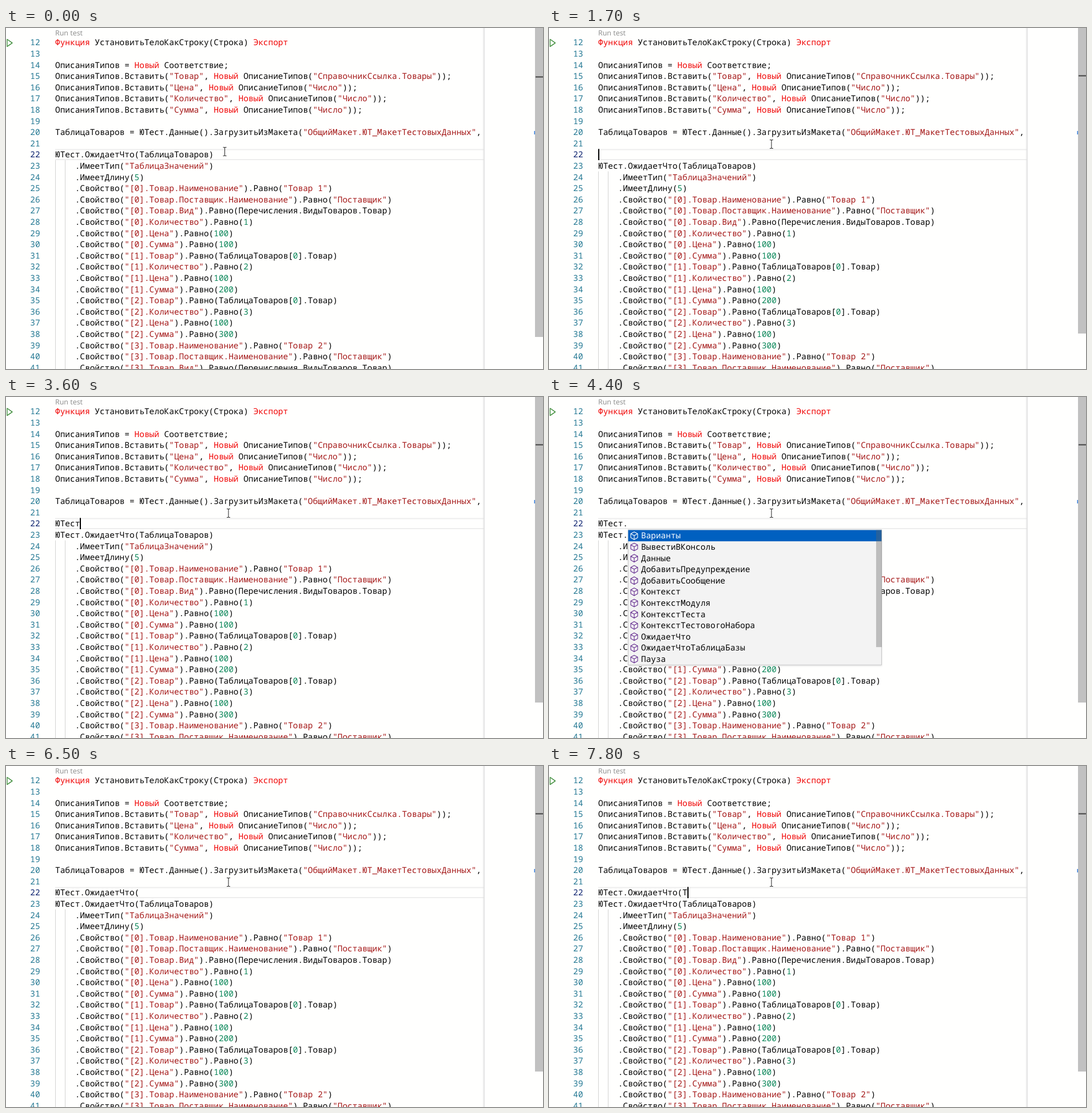
Write an HTML page that moves like this. It is 939x596 px and loops after 8000 ms.

```html
<!DOCTYPE html>
<html lang="ru">
<head>
<meta charset="utf-8">
<title>Автодополнение в редакторе</title>
<style>
  html, body { margin: 0; width: 100%; height: 100%; overflow: hidden; background: #fffffe; }
  svg { display: block; }
  text { font: 14.44px "Noto Sans Mono", monospace; white-space: pre; text-rendering: geometricPrecision; }
  .lens { font: 12.38px "Noto Sans", sans-serif; fill: #919191; }
  .num { fill: #237893; text-anchor: end; }
  .num.active { fill: #0b216f; }
  .key { fill: #f00000; }
  .str { fill: #a31515; }
  .lit { fill: #098658; }
  .match { font-weight: 700; fill: #0066bf; }
  .selected .match { fill: #9dddff; }
  .selected text { fill: #fff; }
  .cube { fill: none; stroke: #652d90; stroke-width: 1.1; stroke-linejoin: round; }
  .selected .cube { stroke: #fff; }
</style>
</head>
<body>
<svg id="stage" width="939" height="596" viewBox="0 0 939 596">
  <defs>
    <linearGradient id="edge">
      <stop offset="0" stop-color="#ddd" stop-opacity="0"/>
      <stop offset="1" stop-color="#ddd"/>
    </linearGradient>
    <filter id="shadow" x="-5%" y="-20%" width="110%" height="150%">
      <feDropShadow dx="0" dy="1" stdDeviation="1.5" flood-color="#000" flood-opacity=".14"/>
    </filter>
    <path id="cube" d="M0-6.6 6-3.4V3.4L0 6.8-6 3.4V-3.4ZM-6-3.4 0-.2 6-3.4M0-.2V6.8"/>
  </defs>
  <text class="lens" x="86" y="13">Run test</text>
  <path d="M2 19.8V32.4L11 26.1Z" fill="none" stroke="#388a34" stroke-width="1.3" stroke-linejoin="round"/>
  <g id="editor"></g>
  <rect x="833" width="4" height="596" fill="url(#edge)"/>
  <rect x="923.5" y="180" width="2" height="6" fill="#3a82e0"/>
  <rect id="slider" x="925" width="14" fill="#c1c1c1"/>
  <rect id="mark" x="926" width="13" height="2" fill="#424242"/>
  <g id="popup"></g>
  <rect id="caret" width="2" height="19.6" fill="#000"/>
  <path id="mouse" d="M-3-7.5H-1L0-6.5 1-7.5H3M0-6.5V6.5M-3 7.5H-1L0 6.5 1 7.5H3" fill="none" stroke="#333" stroke-width="1.1"/>
</svg>
<script>
const LOOP = 8000, LEFT = 86, CHAR = 8.664, ROW = 19.6, FIRST = 12, POPUP_WIDTH = 444;
const el = id => document.getElementById(id);
const lineTop = n => 15.4 + (n - FIRST) * ROW;
const colX = col => LEFT + col * CHAR;

const head = `Функция УстановитьТелоКакСтроку(Строка) Экспорт

ОписанияТипов = Новый Соответствие;
ОписанияТипов.Вставить("Товар", Новый ОписаниеТипов("СправочникСсылка.Товары"));
ОписанияТипов.Вставить("Цена", Новый ОписаниеТипов("Число"));
ОписанияТипов.Вставить("Количество", Новый ОписаниеТипов("Число"));
ОписанияТипов.Вставить("Сумма", Новый ОписаниеТипов("Число"));

ТаблицаТоваров = ЮТест.Данные().ЗагрузитьИзМакета("ОбщийМакет.ЮТ_МакетТестовыхДанных",
`.split("\n");

const prop = (path, value) => `    .Свойство("${path}").Равно(${value})`;
const amounts = (i, count, sum) => [
  prop(`[${i}].Количество`, count), prop(`[${i}].Цена`, 100), prop(`[${i}].Сумма`, sum)];
const product = (i, name) => [
  prop(`[${i}].Товар.Наименование`, `"${name}"`),
  prop(`[${i}].Товар.Поставщик.Наименование`, '"Поставщик"'),
  prop(`[${i}].Товар.Вид`, "Перечисления.ВидыТоваров.Товар")];
const sameProduct = i => prop(`[${i}].Товар`, "ТаблицаТоваров[0].Товар");

const body = [
  "ЮТест.ОжидаетЧто(ТаблицаТоваров)",
  '    .ИмеетТип("ТаблицаЗначений")',
  "    .ИмеетДлину(5)",
  ...product(0, "Товар 1"), ...amounts(0, 1, 100),
  sameProduct(1), ...amounts(1, 2, 200),
  sameProduct(2), ...amounts(2, 3, 300),
  ...product(3, "Товар 2")];

const lists = {
  modules: ["ЮТДанные", "ЮТест"],
  members: ["Варианты", "ВывестиВКонсоль", "Данные", "ДобавитьПредупреждение", "ДобавитьСообщение",
    "Контекст", "КонтекстМодуля", "КонтекстТеста", "КонтекстТестовогоНабора", "ОжидаетЧто",
    "ОжидаетЧтоТаблицаБазы", "Пауза"],
  expects: ["ОжидаетЧто", "ОжидаетЧтоТаблицаБазы"],
  globals: ["ТаблицаТоваров", "ТекущаяДата", "ТекущаяДатаСеанса", "ТекущаяУниверсальнаяДата",
    "ТекущаяУниверсальнаяДатаВМиллисекундах", "ТекущийЯзык", "ТекущийЯзыкСистемы", "Тип", "ТипЗнч", "ТРег"]
};

// Each entry is [start time, value]; a value holds until the next entry.
const activeLine = [[0, 22], [800, 21], [1700, 22]];
const typed = [[0, null], [1700, ""], [2300, "Ю"], [3600, "ЮТест"], [3900, "ЮТест."],
  [5100, "ЮТест.о"], [6000, "ЮТест.ОжидаетЧто("], [6800, "ЮТест.ОжидаетЧто(Т"]];
const caretOn = [[0, 0], [800, 1], [1300, 0], [1700, 1], [2100, 0], [2300, 1], [3000, 0], [3300, 1],
  [4400, 0], [5100, 1], [5600, 0], [6000, 1], [6500, 0], [6800, 1], [7300, 0], [7800, 1]];
const suggestion = (list, col, selected = 0, match = 0) => ({ list, col, selected, match });
const suggestions = [[0, null],
  [2300, suggestion("modules", 1, 0, 1)], [3400, suggestion("modules", 1, 1, 1)], [3600, null],
  [4000, suggestion("members", 6)], [5100, suggestion("expects", 6, 0, 1)],
  [5200, suggestion("expects", 7, 0, 1)], [6000, null],
  [6800, suggestion("globals", 18, 0, 1)], [7800, null]];
const at = (track, t) => track.findLast(([start]) => start <= t)[1];

const token = /("[^"]*")|(Функция|Экспорт|Новый)|(\d+)/g;
const colorize = code => code.replace(token, (m, str, key) =>
  `<tspan class="${str ? "str" : key ? "key" : "lit"}">${m}</tspan>`);

function editorMarkup(active, draft) {
  const lines = [...head, ...(draft === null ? [] : [draft]), ...body].slice(0, 30);
  const guideTop = lineTop(draft === null ? 23 : 24);
  const guides = [86.5, 103.5].map(x =>
    `<path d="M${x} ${guideTop}V596" stroke="#d3d3d3"/>`).join("");
  const border = `<path d="M86 ${lineTop(active) + 1}H836m0 ${ROW - 2}H86" stroke="#eee" stroke-width="2"/>`;
  return border + guides + lines.map((code, i) => {
    const n = FIRST + i, y = lineTop(n) + 14.9;
    return `<text class="num${n === active ? " active" : ""}" x="59.6" y="${y}">${n}</text>` +
      `<text x="${LEFT}" y="${y}">${colorize(code)}</text>`;
  }).join("");
}

function popupMarkup(s) {
  if (!s) return "";
  const items = lists[s.list], x = colX(s.col), top = 232.6;
  const rows = items.map((name, i) => {
    const y = top + i * ROW, selected = i === s.selected;
    const label = s.match
      ? `<tspan class="match">${name.slice(0, s.match)}</tspan>${name.slice(s.match)}` : name;
    return `<g class="${selected ? "selected" : ""}">` +
      (selected ? `<rect x="${x + .5}" y="${y}" width="${POPUP_WIDTH - 1}" height="${ROW}" fill="#0060c0"/>` : "") +
      `<use href="#cube" class="cube" x="${x + 11}" y="${y + 9.8}"/>` +
      `<text x="${x + 23}" y="${y + 14.7}">${label}</text></g>`;
  }).join("");
  const bar = s.list === "members"
    ? `<rect id="bar" x="${x + POPUP_WIDTH - 10}" y="${top}" width="10" height="204.5" fill="#646464" fill-opacity=".4"/>` : "";
  return `<rect x="${x + .5}" y="${top - .5}" width="${POPUP_WIDTH - 1}" height="${items.length * ROW + 1}"` +
    ` fill="#f3f3f3" stroke="#c8c8c8" filter="url(#shadow)"/>` + rows + bar;
}

const drawn = {};
function fill(id, key, markup) {
  if (drawn[id] === key) return;
  drawn[id] = key;
  el(id).innerHTML = markup();
}

function setAttrs(id, attrs) {
  for (const name in attrs) el(id).setAttribute(name, attrs[name]);
}

const clamp = v => Math.max(0, Math.min(1, v));

function render(time) {
  const t = Math.floor(time / 100) * 100;
  const active = at(activeLine, t), draft = at(typed, t), hint = at(suggestions, t);
  const inserted = draft !== null;

  fill("editor", `${active}|${draft}`, () => editorMarkup(active, draft));
  fill("popup", JSON.stringify(hint), () => popupMarkup(hint));
  if (el("bar")) {
    setAttrs("bar", { opacity: Math.min(clamp((t - 3950) / 100), clamp(1 - (t - 4350) / 800)) });
  }

  setAttrs("slider", { height: inserted ? 534 : 540 });
  setAttrs("mark", { y: active === 21 ? 74.5 : inserted ? 82.5 : 84.5 });
  setAttrs("caret", {
    x: Math.round(colX((draft || "").length)),
    y: lineTop(active),
    opacity: at(caretOn, t)
  });
  const move = clamp((t - 300) / 300);
  setAttrs("mouse", { transform: `translate(${382.5 + 6.5 * move} ${216 - 13 * move})` });
}

function frame(now) {
  render(now % LOOP);
  requestAnimationFrame(frame);
}
render(0);
requestAnimationFrame(frame);
</script>
</body>
</html>
```
